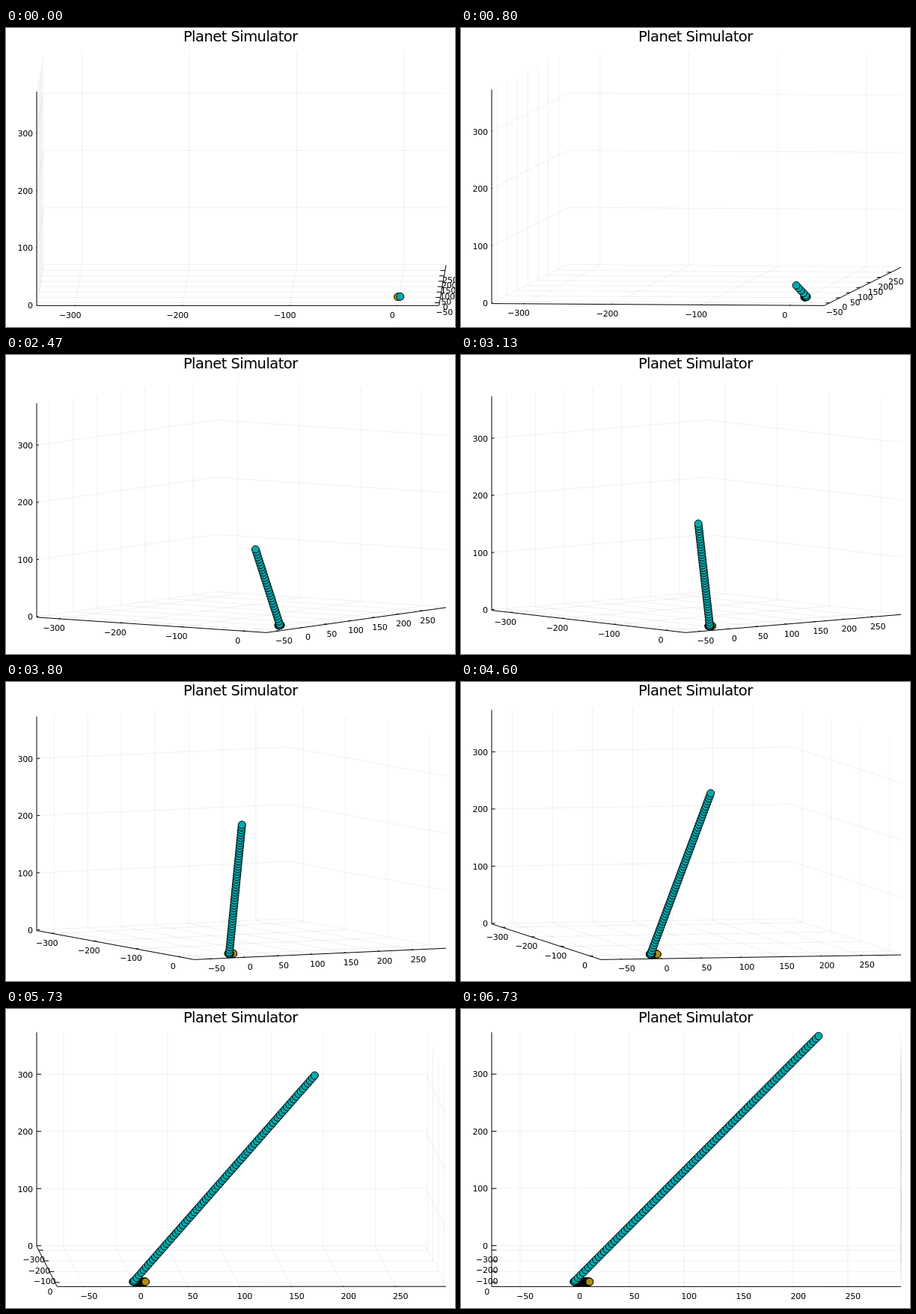
An HTML page with a canvas for the animation above (6790 ms loop, 600x400 px).

```html
<!DOCTYPE html>
<html lang="en">
<head>
<meta charset="utf-8">
<title>Planet Simulator</title>
<style>
  html, body { margin: 0; width: 100%; height: 100%; overflow: hidden; background: #fff; }
  canvas { display: block; width: 600px; height: 400px; }
</style>
</head>
<body>
<canvas id="plot" width="600" height="400"></canvas>
<script>
const ctx = document.getElementById('plot').getContext('2d');
const LOOP = 6790, LAST = 101;
const FONT = '"DejaVu Sans", sans-serif';
const X = { min: -335.6, max: 39, ticks: [-300, -200, -100, 0] };
const Y = { min: -76, max: 298.6, ticks: [-50, 0, 50, 100, 150, 200, 250] };
const Z = { min: -1, max: 373.2, ticks: [0, 100, 200, 300] };
const SPAN = 374.6, LEFT = 41, WIDTH = 547, GROUND = 370.6, DEPTH = 54, RISE = 0.765;
const TICK = SPAN * 0.0118;

let sin = 0, cos = 1;

function setCamera(degrees) {
  const a = degrees * Math.PI / 180;
  sin = Math.sin(a);
  cos = Math.cos(a);
}

function project(x, y, z) {
  const across = ((x - X.min) * cos + (y - Y.min) * sin) / (sin + cos);
  const back = (X.max - x) * sin * sin + (y - Y.min) * cos * cos;
  return [LEFT + across * WIDTH / SPAN, GROUND - back * DEPTH / SPAN - z * RISE];
}

function line(...points) {
  ctx.beginPath();
  for (const p of points) ctx.lineTo(...project(...p));
  ctx.stroke();
}

function setFont(size, spacing) {
  ctx.font = size + 'px ' + FONT;
  ctx.letterSpacing = spacing + 'px';
}

function label(value, px, py, align) {
  ctx.textAlign = align;
  ctx.fillText(String(value).replace('-', '\u2212'), px, py);
}

function drawGrid() {
  ctx.lineWidth = 1;
  ctx.strokeStyle = 'rgba(0,0,0,0.06)';
  for (const x of X.ticks) line([x, Y.min, Z.min], [x, Y.max, Z.min], [x, Y.max, Z.max]);
  for (const y of Y.ticks) line([X.max, y, Z.min], [X.min, y, Z.min], [X.min, y, Z.max]);
  for (const z of Z.ticks) line([X.min, Y.min, z], [X.min, Y.max, z], [X.max, Y.max, z]);
}

function drawAxes() {
  ctx.strokeStyle = ctx.fillStyle = '#000';
  ctx.lineWidth = 1;
  ctx.textBaseline = 'alphabetic';
  setFont(11.1, -0.3);
  line([X.min, Y.min, Z.max], [X.min, Y.min, Z.min], [X.max, Y.min, Z.min], [X.max, Y.max, Z.min]);
  for (const x of X.ticks) {
    line([x, Y.min, Z.min], [x, Y.min + TICK, Z.min]);
    const [px, py] = project(x, Y.min, Z.min);
    label(x, px - 6.4, py + 16.5, 'center');
  }
  for (const y of Y.ticks) {
    line([X.max, y, Z.min], [X.max - TICK, y, Z.min]);
    const [px, py] = project(X.max, y, Z.min);
    label(y, px + 6.5, py + 16.5, 'center');
  }
  for (const z of Z.ticks) {
    line([X.min, Y.min, z], [X.min, Y.min + TICK, z]);
    const [px, py] = project(X.min, Y.min, z);
    label(z, px - 5.2, py + 4.3, 'right');
  }
  setFont(19.5, -0.54);
  label('Planet Simulator', LEFT + WIDTH / 2 - 1.2, 18, 'center');
}

// The star drifts slowly once the planet has been flung away.
function star(i) {
  return [Math.min(0, i * 0.09 - 0.7), Math.max(0, i - 15) * 0.158, 0];
}

function planet(i) {
  if (i < 8) return [0.4 + 1.2 * Math.cos(i * 0.8), 0.4 + 1.2 * Math.sin(i * 0.8), 0.3];
  const k = i - 8;
  return [0.5 - 3.22 * k, 0.5 + 2.394 * k, 2.4 + 3.99 * k];
}

function drawTrail(path, n, color) {
  ctx.fillStyle = color;
  ctx.strokeStyle = '#000';
  ctx.lineWidth = 1;
  for (let i = 0; i <= n; i++) {
    const [px, py] = project(...path(i));
    ctx.beginPath();
    ctx.arc(px, py, 5, 0, Math.PI * 2);
    ctx.fill();
    ctx.stroke();
  }
}

function draw(ms) {
  const n = Math.min(LAST, Math.floor((ms + 4) * 0.015));
  setCamera(Math.min(n + 1, 90));
  ctx.fillStyle = '#fff';
  ctx.fillRect(0, 0, 600, 400);
  drawGrid();
  drawAxes();
  drawTrail(star, n, '#ac8e18');
  drawTrail(planet, n, '#00a9ad');
}

const start = performance.now();
function tick() {
  draw((performance.now() - start) % LOOP);
  requestAnimationFrame(tick);
}
draw(0);
requestAnimationFrame(tick);
</script>
</body>
</html>
```
